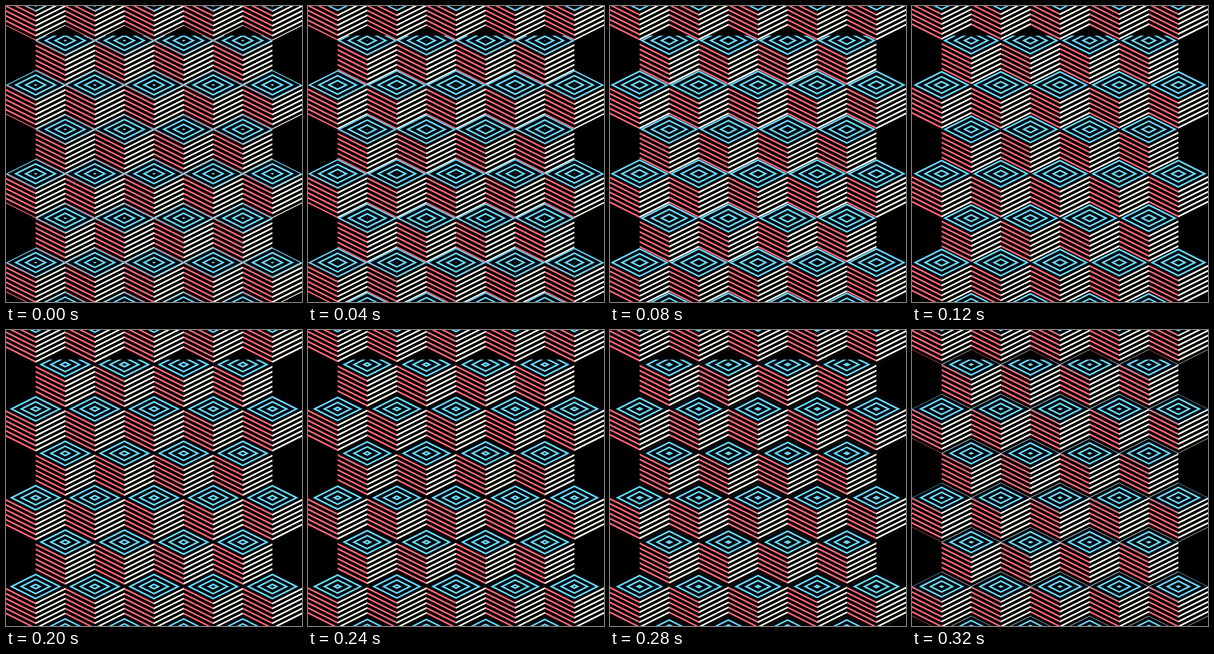
These frames come from a looping animation (540 by 540 pixels, 0.36 s). An HTML page without scripts:

```html
<!DOCTYPE html>
<html lang="en">
<head>
<meta charset="utf-8">
<title>Striped cubes</title>
<style>
  html, body { margin: 0; width: 100%; height: 100%; overflow: hidden; background: #000; }
  svg { display: block; width: 100%; height: 100%; }
  /* one wide dashed line, skewed, fills the stage with sloping stripes */
  .stripes {
    stroke-width: 540;
    stroke-dasharray: 3.3 5.7;
    transform: skewY(26.565deg);
    animation: rise 360ms steps(9) infinite;
  }
  .blue { stroke: #66d4ff; }
  .red { stroke: #ff6677; }
  .white { stroke: #fffff0; }
  /* one stripe gap per loop, one pixel per step */
  @keyframes rise {
    from { stroke-dashoffset: 1.65px; }
    to { stroke-dashoffset: 10.65px; }
  }
</style>
</head>
<body>
<svg viewBox="0 0 540 540">
  <defs>
    <!-- left side faces of the cubes -->
    <pattern id="faces" y="63" width="108" height="162" patternUnits="userSpaceOnUse">
      <path fill="#fff" d="M54 0L108 27V81L54 54z M0 81L54 108V162L0 135z"/>
    </pattern>
    <!-- lower left quarters of the top faces -->
    <pattern id="quarters" y="63" width="108" height="162" patternUnits="userSpaceOnUse">
      <path fill="#fff" d="M54 0H108V27z M0 81H54V108z"/>
    </pattern>
    <mask id="side" maskUnits="userSpaceOnUse" width="540" height="612">
      <rect width="540" height="612" fill="url(#faces)"/>
    </mask>
    <mask id="top" maskUnits="userSpaceOnUse" width="540" height="612">
      <rect width="540" height="612" fill="url(#quarters)"/>
    </mask>
  </defs>

  <rect width="540" height="540"/>

  <g mask="url(#side)">
    <path class="stripes red" d="M270 -288V630"/>
  </g>
  <g mask="url(#side)" transform="translate(540) scale(-1 1)">
    <path class="stripes white" d="M270 -288V630"/>
  </g>

  <!-- the four quarters are mirror images -->
  <g mask="url(#top)">
    <path class="stripes blue" d="M270 -288V630"/>
  </g>
  <g mask="url(#top)" transform="translate(540) scale(-1 1)">
    <path class="stripes blue" d="M270 -288V630"/>
  </g>
  <g mask="url(#top)" transform="translate(0 612) scale(1 -1)">
    <path class="stripes blue" d="M270 -288V630"/>
  </g>
  <g mask="url(#top)" transform="translate(540 612) scale(-1 -1)">
    <path class="stripes blue" d="M270 -288V630"/>
  </g>
</svg>
</body>
</html>
```
